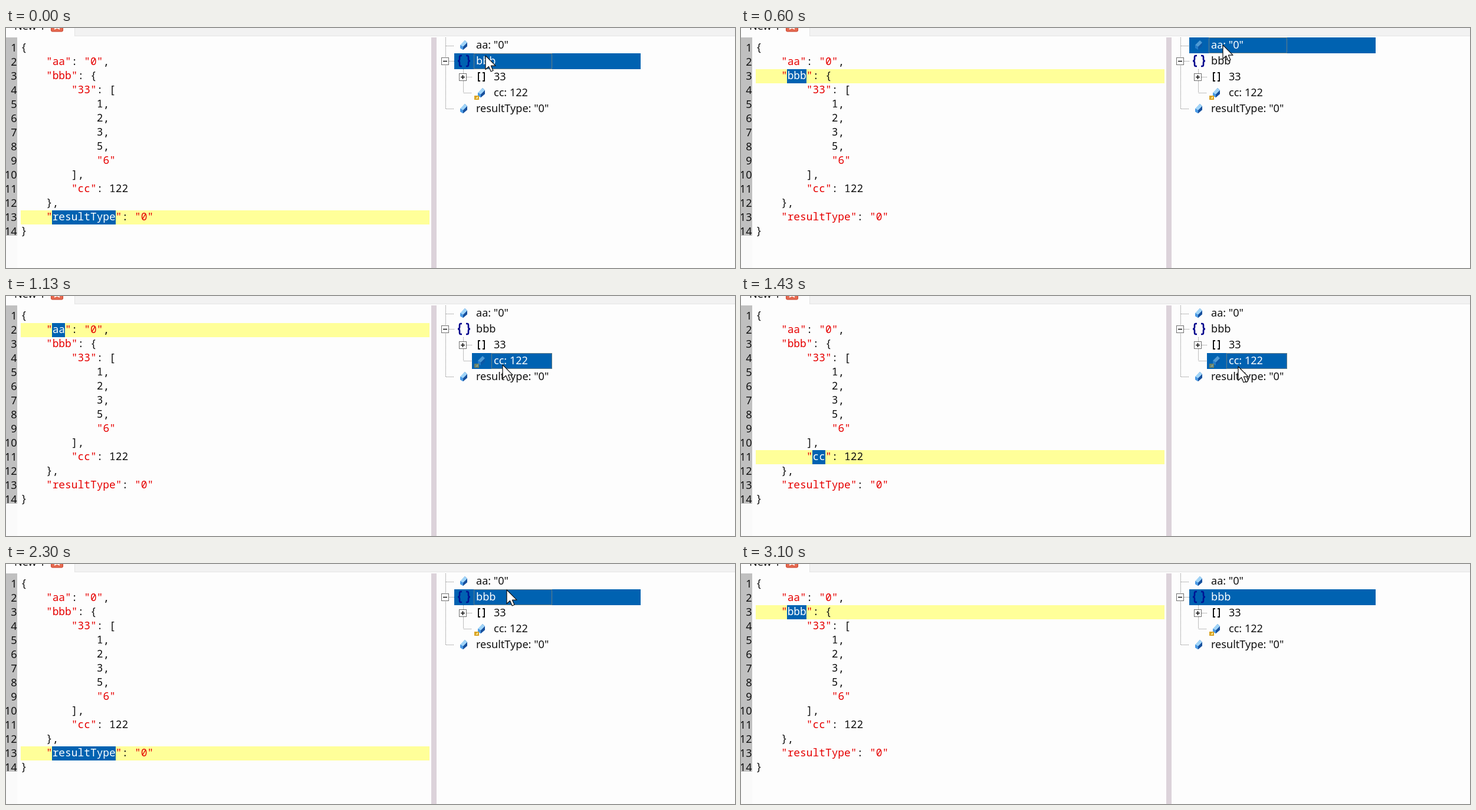
Animation, 1236 px wide and 408 px high, one loop 3130 ms. Source, as an HTML page:

```html
<!DOCTYPE html>
<html lang="en">
<head>
<meta charset="utf-8">
<title>JSON tree viewer</title>
<style>
  html, body { margin: 0; width: 100%; height: 100%; overflow: hidden; background: #fdfdfd; }
  svg { display: block; width: 1236px; height: 408px; }
  text { white-space: pre; fill: #111; }
  .ui { font: 18.1px "Noto Sans", "Open Sans", sans-serif; }
  .code { font: 17.88px "Noto Sans Mono", monospace; }
  .string { fill: #e60000; font-weight: 500; }
  .selected { fill: #fff; }
  .dots { fill: none; stroke: #808080; stroke-dasharray: 1 1; }
</style>
</head>
<body>
<svg id="stage" viewBox="0 0 1236 408">
  <defs>
    <g id="cube">
      <path d="M-6 1 L2 -8 L6 -4 L6 2 L-1 8 L-6 5Z" fill="#2468b8"/>
      <path d="M-6 0 L2 -8 L6 -4 L-1 3Z" fill="#9fd4f8"/>
      <path d="M-6 0 L-1 3 L-1 8 L-6 5Z" fill="#4a9be6"/>
      <path d="M-1 3 L6 -4 L6 2 L-1 8Z" fill="#174f9c"/>
    </g>
    <g id="cornerCube">
      <use href="#cube"/>
      <rect x="-12" y="5" width="8" height="7" fill="#d9a323"/>
      <path d="M-10 10 L-6 6 V10Z" fill="#fff0a0"/>
    </g>
    <path id="braces" fill="none" stroke="#00008c" stroke-width="2.6"
      d="M-3 -9 H-5 Q-7 -9 -7 -6 V-3 Q-7 0 -10 0 Q-7 0 -7 3 V6 Q-7 9 -5 9 H-3
         M4 -9 H6 Q8 -9 8 -6 V-3 Q8 0 11 0 Q8 0 8 3 V6 Q8 9 6 9 H4"/>
    <path id="brackets" fill="none" stroke="#111" stroke-width="2"
      d="M-2 -7 H-5 V7 H-2 M2 -7 H5 V7 H2"/>
  </defs>

  <rect width="1236" height="13" fill="#f2f2f2"/>
  <rect width="116" height="13" fill="#fdfdfd"/>
  <path d="M116.5 0 V13 M116 13.5 H1236" stroke="#e4e4e4"/>
  <text class="ui" x="14" y="3">New 1</text>
  <rect x="76.5" y="-12" width="20" height="18" rx="2" fill="#e56a50" stroke="#c9402c"/>
  <path d="M82 -4 L91 2 M91 -4 L82 2" stroke="#fff" stroke-width="2"/>

  <rect y="16" width="19" height="337" fill="#c0c0c0"/>
  <rect y="353" width="19" height="55" fill="#fafafa"/>
  <rect x="721" y="16" width="9" height="392" fill="#dcd2da"/>

  <rect id="lineBand" x="25" width="693" height="24" fill="#ffff99"/>
  <rect id="wordBand" height="24" fill="#0062b1"/>
  <g id="editor"></g>

  <path class="dots" d="M745.5 16 V137 M746 30.5 H760 M751 56.5 H760 M746 137.5 H760
    M775.5 70 V110 M781 83.5 H790 M776 110.5 H790"/>
  <g fill="#fff" stroke="#707070">
    <rect x="738.5" y="50.5" width="12" height="12"/>
    <rect x="768.5" y="77.5" width="12" height="12"/>
  </g>
  <path d="M741 56.5 H748 M771 83.5 H778 M774.5 80 V87" stroke="#111" stroke-width="1.6"/>
  <rect id="rowBand" height="27" fill="#0062b1"/>
  <g id="tree"></g>
  <rect id="focus" y="0" height="26" fill="none" stroke="#d09a58" stroke-dasharray="1 1"/>

  <path id="cursor" d="M0 0 V23.5 L5.5 18.5 L9.2 27 L13 25.3 L9.4 17.2 H17Z"
    fill="#fff" stroke="#111" stroke-width="1.2" stroke-linejoin="round"/>
</svg>
<script>
const LOOP = 3130, CHAR = 10.728, LINE = 24, ROW = 27;
const get = id => document.getElementById(id);

function add(parent, tag, attributes, content = "") {
  const node = document.createElementNS("http://www.w3.org/2000/svg", tag);
  set(node, attributes);
  node.textContent = content;
  return parent.appendChild(node);
}
function set(node, attributes) {
  for (const key in attributes) node.setAttribute(key, attributes[key]);
}

const source = `{
    "aa": "0",
    "bbb": {
        "33": [
            1,
            2,
            3,
            5,
            "6"
        ],
        "cc": 122
    },
    "resultType": "0"
}`.split("\n");

const words = {};
source.forEach((line, i) => {
  const y = 39 + i * LINE;
  add(get("editor"), "text", { class: "ui", x: 18.5, y: y + 1, "text-anchor": "end" }, i + 1);
  const indent = line.search(/\S/);
  const text = add(get("editor"), "text", { class: "code", x: 25 + indent * CHAR, y });
  let column = indent, quoted = false;
  for (const part of line.trim().match(/"|[^"]+/g)) {
    const red = quoted || part === '"';
    const node = add(text, "tspan", red ? { class: "string" } : {}, part);
    if (part === '"') quoted = !quoted;
    else if (quoted) words[part] ??= { node, line: i, column, length: part.length };
    column += part.length;
  }
});

const rows = [
  { key: "aa", label: 'aa: "0"', icon: "cube", depth: 0 },
  { key: "bbb", label: "bbb", icon: "braces", depth: 0 },
  { key: "33", label: "33", icon: "brackets", depth: 1 },
  { key: "cc", label: "cc: 122", icon: "cornerCube", depth: 1 },
  { key: "resultType", label: 'resultType: "0"', icon: "cube", depth: 0 }
];
rows.forEach((row, i) => {
  const x = 776 + row.depth * 30, y = 29 + i * ROW;
  row.iconNode = add(get("tree"), "use", { href: "#" + row.icon, x, y });
  row.textNode = add(get("tree"), "text", { class: "ui", x: x + 21, y: y + 6 }, row.label);
});

// [start time, selected key]; the editor follows the tree after a short delay
const treeSteps = [[0, "bbb"], [500, "aa"], [1040, "cc"], [1780, "resultType"], [2230, "bbb"]];
const editorSteps = [[0, "resultType"], [140, "bbb"], [630, "aa"], [1170, "cc"],
  [1890, "resultType"], [2430, "bbb"]];

// [time, x, y] of the pointer tip
const pointer = [[0, 813, 47], [270, 813, 42], [460, 815, 27], [620, 817, 29], [870, 831, 92],
  [1040, 842, 117], [1430, 843, 120], [1600, 844, 123], [1760, 847, 138], [2020, 847, 138],
  [2210, 849, 44], [2720, 849, 44], [2950, 852, -40], [LOOP, 852, -40]];

const current = (steps, t) => steps.findLast(step => step[0] <= t)[1];

function pointerAt(t) {
  const i = pointer.findIndex(p => p[0] > t);
  const [t0, x0, y0] = pointer[i - 1], [t1, x1, y1] = pointer[i];
  const u = (t - t0) / (t1 - t0), s = u * u * (3 - 2 * u);
  return [x0 + (x1 - x0) * s, y0 + (y1 - y0) * s].map(Math.round);
}

function draw(t) {
  const treeKey = current(treeSteps, t), editorKey = current(editorSteps, t);
  rows.forEach((row, i) => {
    const active = row.key === treeKey;
    row.textNode.classList.toggle("selected", active);
    row.iconNode.setAttribute("opacity", active ? 0.5 : 1);
    if (row.icon === "braces") row.iconNode.setAttribute("opacity", active ? 0.8 : 1);
    if (!active) return;
    const x = 760 + row.depth * 30, y = 16 + i * ROW;
    set(get("rowBand"), { x, y, width: row.depth ? 136 : 316 });
    set(get("focus"), { x: x + 33.5, y: y + 0.5, width: 892 - x - 0.5 + 0.5,
      visibility: t < 2950 ? "visible" : "hidden" });
  });
  for (const key in words) words[key].node.classList.toggle("selected", key === editorKey);
  const word = words[editorKey], y = 22 + word.line * LINE;
  set(get("lineBand"), { y });
  set(get("wordBand"), { x: Math.floor(25 + word.column * CHAR), y,
    width: Math.round(word.length * CHAR) + 1 });
  set(get("cursor"), { transform: `translate(${pointerAt(t)})` });
}

const start = performance.now();
function frame() {
  draw((performance.now() - start) % LOOP);
  requestAnimationFrame(frame);
}
frame();
</script>
</body>
</html>
```
